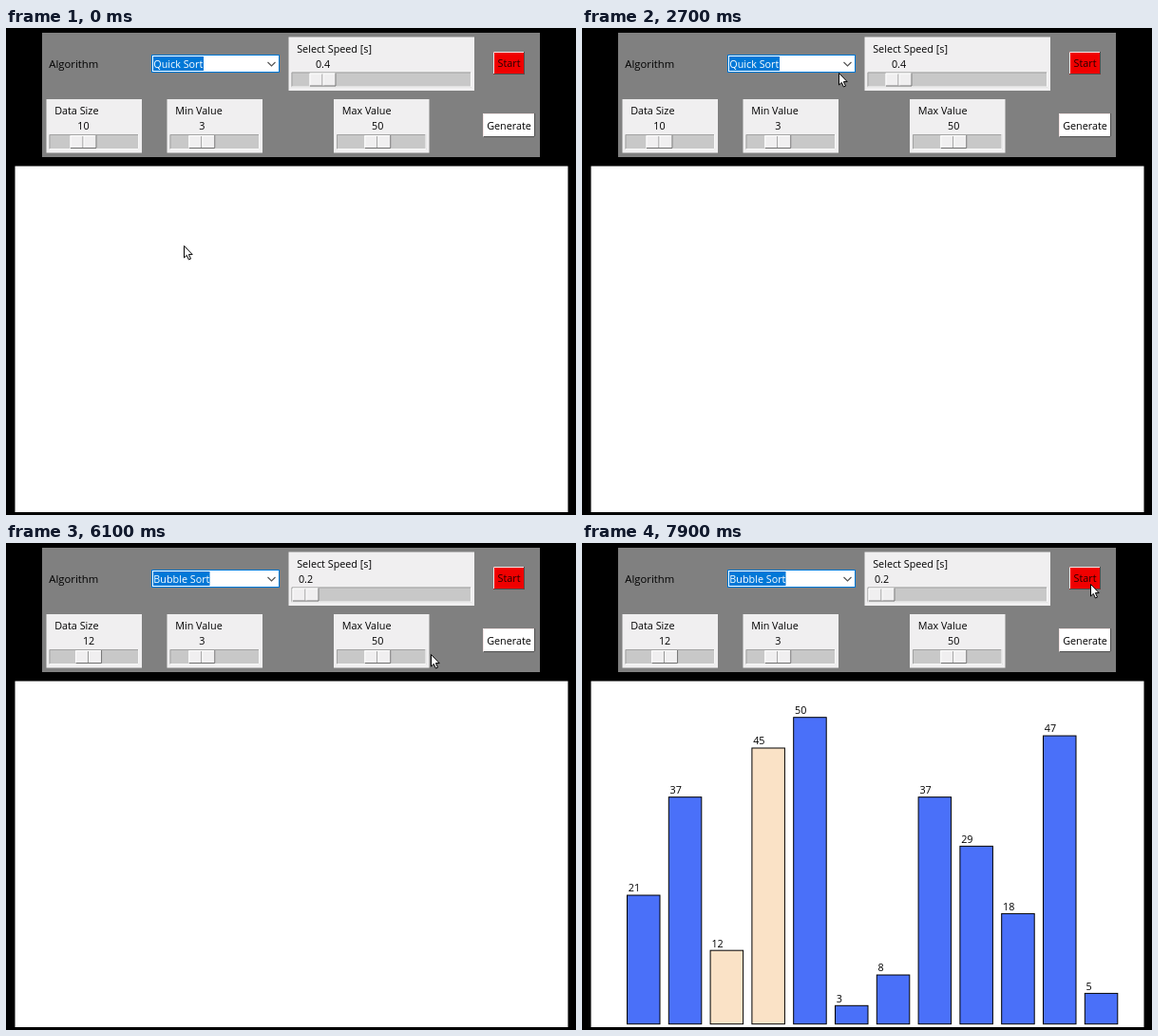
An HTML page that plays this animation: 600 by 513 pixels, repeating every 8 s.

```html
<!DOCTYPE html>
<html lang="en">
<head>
<meta charset="utf-8">
<title>Sorting visualiser</title>
<style>
  html, body { margin: 0; width: 100%; height: 100%; overflow: hidden; background: #000; }
  svg { display: block; width: 600px; height: 513px; }
  text { font: 10.8px "Open Sans", "Noto Sans", sans-serif; fill: #000; white-space: pre; }
</style>
</head>
<body>
<svg id="stage" viewBox="0 0 600 513"></svg>
<script>
const LOOP = 8000, STEP = 100;
const BLUE = '#4a70f9', CREAM = '#fae2c6', FACE = '#f0eff0', SELECT = '#0078d7';
const stage = document.getElementById('stage');

function add(parent, tag, attrs, text) {
  const node = document.createElementNS('http://www.w3.org/2000/svg', tag);
  set(node, attrs);
  if (text !== undefined) node.textContent = text;
  parent.appendChild(node);
  return node;
}
function set(node, attrs) {
  for (const key in attrs) node.setAttribute(key, attrs[key]);
}
const group = (parent = stage) => add(parent, 'g', {});
const box = (parent, x, y, width, height, fill, extra) =>
  add(parent, 'rect', { x, y, width, height, fill, ...extra });
const label = (parent, x, y, text, extra) => add(parent, 'text', { x, y, ...extra }, text);
const show = (node, on) => node.setAttribute('visibility', on ? 'visible' : 'hidden');

// Two-tone edge: light and dark swap when the widget is sunken.
function bevel(parent, x, y, w, h, light, dark) {
  const line = (d, stroke) => add(parent, 'path', { d, stroke, fill: 'none' });
  return [
    line(`M${x + .5} ${y + h - 1}V${y + .5}H${x + w - 1}`, light),
    line(`M${x + .5} ${y + h - .5}H${x + w - .5}V${y}`, dark)
  ];
}

function makeScale(x, y, width, title, centre) {
  box(stage, x, y, width, 56.5, FACE);
  label(stage, x + 8.7, y + 16, title);
  const value = label(stage, centre, y + 32.3, '', { 'text-anchor': 'middle' });
  box(stage, x + 3, y + 37, width - 6, 16, '#c8c8c8');
  bevel(stage, x + 3, y + 37, width - 6, 16, '#a2a2a2', '#f8f8f8');
  const thumb = group();
  box(thumb, -14, y + 38, 28, 14, FACE);
  bevel(thumb, -14, y + 38, 28, 14, '#fff', '#6e6e6e');
  box(thumb, -1, y + 39, 1, 12, '#8a8a8a');
  box(thumb, 0, y + 39, 1, 12, '#fff');
  return (amount, at = centre) => {
    value.textContent = amount;
    value.setAttribute('x', at);
    thumb.setAttribute('transform', `translate(${at})`);
  };
}

function makeButton(x, y, w, h, title, fill, pressedFill, ink) {
  const face = box(stage, x, y, w, h, fill);
  const [upper, lower] = bevel(stage, x, y, w, h, '#fff', '#505050');
  const text = label(stage, x + w / 2, y + h / 2 + 4.2, title, { 'text-anchor': 'middle', fill: ink });
  text.style.fill = ink;
  return pressed => {
    face.setAttribute('fill', pressed ? pressedFill : fill);
    upper.setAttribute('stroke', pressed ? '#606060' : '#f4e4e4');
    lower.setAttribute('stroke', pressed ? '#fff' : '#505050');
    text.setAttribute('transform', pressed ? 'translate(1 1)' : '');
  };
}

box(stage, 0, 0, 600, 513, '#000');
box(stage, 38, 5, 524, 131, '#808080');
box(stage, 9.5, 145.5, 582, 364.5, '#fff');
label(stage, 45.3, 42, 'Algorithm', { style: 'font-size:11.3px' });

// Combo box
box(stage, 153.5, 28.5, 134, 18, '#fff', { stroke: SELECT });
const selection = box(stage, 155, 30, 53, 15, SELECT);
const chosen = label(stage, 155.3, 42, '');
chosen.style.fill = '#fff';
add(stage, 'path', { d: 'M275.5 36L279.5 40L283.5 36', fill: 'none', stroke: '#555', 'stroke-width': 1.2 });

const setSpeed = makeScale(297.5, 9.5, 195.5, 'Select Speed [s]', 333.5);
const setSize = makeScale(42.5, 75, 100.5, 'Data Size', 81.5);
const setMin = makeScale(169.5, 75, 100.5, 'Min Value', 206.3);
const setMax = makeScale(345, 75, 100.5, 'Max Value', 391.3);
setMin(3);
setMax(50);
const pressStart = makeButton(513, 25, 33, 24, 'Start', '#f00000', '#f00000', '#2a0000');
const pressGenerate = makeButton(502, 90, 55, 25, 'Generate', '#fff', FACE, '#000');

// Open list of the combo box
const list = group();
box(list, 153.5, 47.5, 134, 49, '#fff', { stroke: '#000' });
const hover = box(list, 154, 48, 133, 16, SELECT);
const options = ['Bubble Sort', 'Quick Sort', 'Merge Sort'].map((name, i) =>
  label(list, 155.3, 60 + 16 * i, name));

// Bars
const DATA = [21, 37, 45, 12, 50, 3, 8, 37, 29, 18, 47, 5];
const chart = group();
const bars = DATA.map((_, i) => {
  const x = 47.5 + 43.8 * i;
  return {
    rect: box(chart, x, 0, 34.5, 0, BLUE, { stroke: '#000' }),
    text: label(chart, x + 1.3, 0, '')
  };
});
function drawBars(values, lit) {
  bars.forEach(({ rect, text }, i) => {
    const height = 6.46 * values[i], y = 506.7 - height;
    set(rect, { y, height, fill: lit.includes(i) ? CREAM : BLUE });
    text.setAttribute('y', y - 3.6);
    text.textContent = values[i];
  });
}

const cursor = add(stage, 'path', {
  d: 'M.5 .5V13L3.3 10.4L5.4 15L7.5 14.1L5.4 9.6H9.2Z',
  fill: '#fff', stroke: '#000', 'stroke-width': 1, 'stroke-linejoin': 'round'
});

// time, x, y
const PATH = [
  [0, 187, 229], [950, 187, 229], [1700, 70, 218], [1900, 70, 218],
  [2700, 270, 47], [2800, 277, 39], [3000, 277, 39], [3400, 210, 56],
  [3600, 205, 58], [4050, 104, 114], [4600, 104, 114], [4750, 130, 129],
  [5200, 368, 69], [5400, 308, 53], [5800, 308, 53], [6250, 495, 140],
  [6650, 529, 101], [7150, 529, 101], [7600, 535, 43], [LOOP, 535, 43]
];
function cursorAt(t) {
  const i = PATH.findIndex(p => p[0] > t);
  const [t0, x0, y0] = PATH[i - 1], [t1, x1, y1] = PATH[i];
  const u = (t - t0) / (t1 - t0), k = u * u * (3 - 2 * u);
  return [x0 + (x1 - x0) * k, y0 + (y1 - y0) * k];
}

function render(time) {
  const t = Math.floor(time % LOOP / STEP) * STEP;
  const [x, y] = cursorAt(t);
  cursor.setAttribute('transform', `translate(${Math.round(x)} ${Math.round(y)})`);

  const bubble = t >= 3500;
  chosen.textContent = bubble ? 'Bubble Sort' : 'Quick Sort';
  selection.setAttribute('width', bubble ? 59.5 : 53);

  show(list, t >= 2900 && t < 3500);
  const row = y < 48 ? 1 : Math.min(2, Math.floor((y - 48) / 16));
  hover.setAttribute('y', 48 + 16 * row);
  options.forEach((o, i) => { o.style.fill = i === row ? '#fff' : '#000'; });

  const size = 10 + (t >= 4300) + (t >= 4500);
  setSize(size, 81.5 + 2.8 * (size - 10));
  const slower = (t >= 5500) + (t >= 5700);
  setSpeed((0.4 - 0.1 * slower).toFixed(1), 333.5 - 9 * slower);

  pressGenerate(t >= 6800 && t < 7000);
  pressStart(t === 7700);

  show(chart, t >= 7000);
  const values = DATA.slice();
  const swapped = t >= 7800;
  if (swapped) [values[2], values[3]] = [values[3], values[2]];
  drawBars(values, swapped ? [2, 3] : []);
}

const begin = performance.now();
function tick() {
  render(performance.now() - begin);
  requestAnimationFrame(tick);
}
render(0);
requestAnimationFrame(tick);
</script>
</body>
</html>
```
